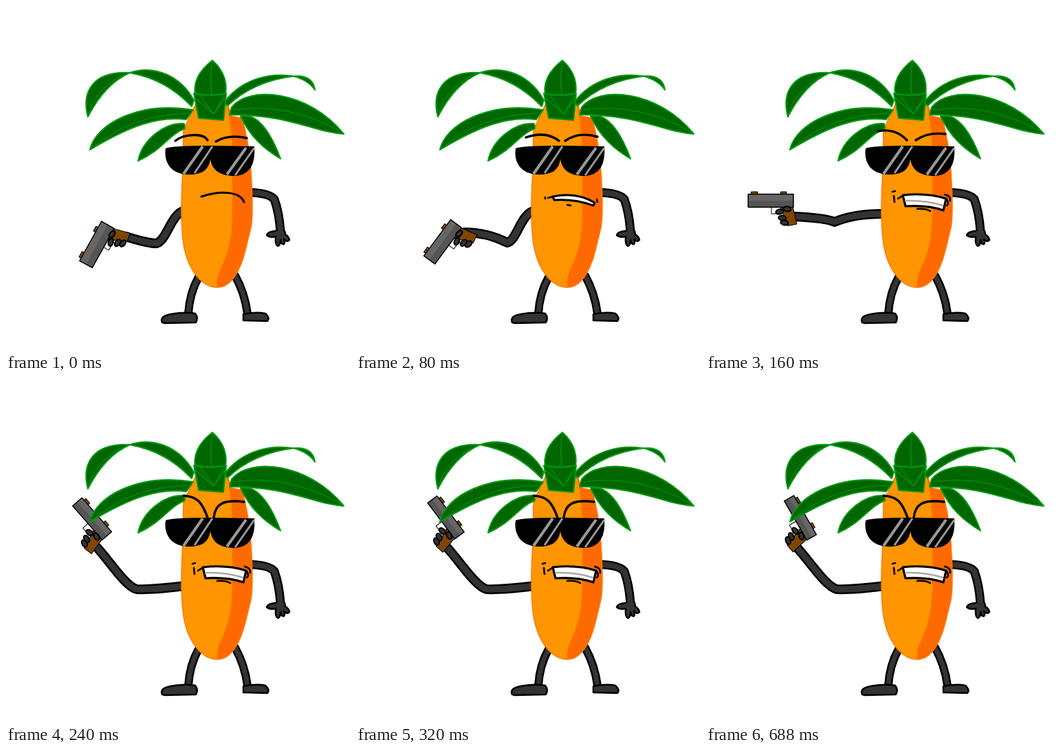
An HTML page with a canvas that plays this animation: 500x500 px, repeating every 0.88 s.

```html
<!DOCTYPE html>
<html lang="en">
<head>
<meta charset="utf-8">
<title>Cool carrot</title>
<style>
html, body { margin: 0; width: 100%; height: 100%; overflow: hidden; background: #fff; }
canvas { display: block; width: 100vmin; height: 100vmin; }
</style>
</head>
<body>
<canvas id="stage" width="500" height="500"></canvas>
<script>
const ctx = document.getElementById('stage').getContext('2d');
const LOOP = 880, STEP = 80;
const DARK = '#333', LEAF = '#006600', RIM = '#009911', BROWN = '#804600';

ctx.lineCap = ctx.lineJoin = 'round';

function shape(d, fill, stroke, width = 2) {
  const path = new Path2D(d);
  if (fill) { ctx.fillStyle = fill; ctx.fill(path); }
  if (stroke) { ctx.strokeStyle = stroke; ctx.lineWidth = width; ctx.stroke(path); }
}
const line = (d, width = 3, color = '#000') => shape(d, null, color, width);
const leaf = d => shape(d, LEAF, RIM, 2);

function limb(d, width = 13) {
  line(d, width);
  line(d, width - 5, DARK);
}

function box(x, y, w, h, fill) {
  shape(`M${x} ${y}h${w}v${h}h${-w}z`, fill, '#000', 1);
}

// Gun points left at angle 0; x, y is the middle of its slide.
const aim = (x, y, angle, arm) => ({ x, y, angle, arm });
const raised = 'M260 302Q212 308 190 307C174 303 152 268 ';
const guns = [
  aim(132, 347, -61, 'M260 297C239 302 234 342 218 345Q206 345 174 335'),
  aim(126, 343, -53.5, 'M260 297C239 302 234 341 220 344Q190 329 158 329'),
  aim(94, 283, 0, 'M260 302Q213 302 187 314Q174 308 127 306'),
  aim(125, 204.5, 49, raised + '132 246'),
  aim(130.5, 202.5, 53, raised + '132 246'),
  aim(137, 203, 60, raised + '131 245')
];

const brows = [
  'M246 196C258 186 287 184 293 195M305 197Q324 186 350 192',
  'M247 191Q276 181 295 196M304 196Q324 182 351 190',
  'M250 182Q275 177 292 195M305 195Q322 183 348 186',
  'M258 171Q273 172 280 179T293 203M302 203C304 183 316 176 346 180'
];

function drawGun({ x, y, angle, arm }, thick) {
  limb(arm, 14);
  ctx.save();
  ctx.translate(x, y);
  ctx.rotate(angle * Math.PI / 180);
  const top = -thick / 2;
  box(1.5, 8, 13, 11, '#fff');
  shape('M14 8H32L38 34 25 36.5Z', BROWN, '#000', 1);
  box(-28, top - 3.5, 9, 4, BROWN);
  box(15, top - 3.5, 8, 4, BROWN);
  box(-32.5, top, 65.5, thick, '#555');
  shape(`M-32 ${top}H32.5V0H-32Z`, '#666');
  line(`M-32.5 ${top}H33V${-top}H-32.5Z`, 1.3);
  for (const [fx, fy, tilt] of [[24, 12, 0.2], [13, 16, -0.2], [17, 25, 0.1], [20, 32, 0.2]]) {
    ctx.beginPath();
    ctx.ellipse(fx, fy, 5.6, 3.5, tilt, 0, 7);
    ctx.fillStyle = DARK;
    ctx.fill();
    ctx.strokeStyle = '#000';
    ctx.lineWidth = 2;
    ctx.stroke();
  }
  ctx.restore();
}

function drawLimbs() {
  limb('M280 394Q267 417 265 447', 12);
  limb('M333 392Q347 417 351 447', 12);
  shape('M227 460Q223 451 239 448Q262 444 275 447Q280 453 276 460L231 461Z', DARK, '#000', 2.5);
  shape('M345 457V448Q365 444 377 447Q384 453 380 458Z', DARK, '#000', 2.5);
  limb('M354 271Q383 272 390 281Q397 300 399 328');
  shape('M392 327Q380 328 379 333Q383 337 392 335Q391 347 395 349Q399 348 399 340Q400 347 404 346Q406 344 404 339Q409 344 412 340Q411 335 406 332L405 327', DARK, '#000', 2.5);
}

function drawBody() {
  const side = 'L328 160 343 163Q353 197 356 240Q360 302 356 322L348 355C340 387 326 409 307 409';
  const body = 'M258 180L271 152 277 140 321 140' + side +
    'C284 409 262 382 257 339Q253 300 257 240Z';
  shape(body, '#ff9500');
  shape('M321 140' + side + 'Q305 396 313 380C332 341 329 310 329 240Q331 190 321 140Z', '#ff6a00');
  line(body, 1.5, '#ff7a00');
}

function drawLeaves() {
  leaf('M119 161C110 127 124 94 180 97C157 107 137 126 119 161Z');
  leaf('M180 97C218 84 255 104 273 137L270 146C244 119 217 104 180 97Z');
  leaf('M122 209C130 172 192 138 272 151L262 165C220 160 180 174 122 209Z');
  leaf('M192 225C198 194 232 168 259 171L260 178C235 188 228 209 192 225Z');
  leaf('M317 140C344 104 386 97 418 102C377 107 347 121 322 145Z');
  leaf('M418 102Q446 100 449 122Q440 108 418 102Z');
  leaf('M341 160L354 160C375 167 389 195 399 222C374 207 355 190 341 160Z');
  leaf('M325 158L328 147C352 116 438 121 491 186C445 183 415 158 325 158Z');
  line('M331 151Q410 139 489 184M125 207Q180 158 265 156M120 159Q125 126 168 101', 1, RIM);
  leaf('M277 137C268 112 283 92 300 79C320 97 323 117 317 137Z');
  leaf('M273 127Q297 132 320 127L316 166 280 163Z');
  line('M300 80Q296 103 299 128M274 133L302 157 320 132M282 130L302 157 317 131', 1.2, RIM);
}

function drawShades() {
  shape('M232 207Q240 203 300 203L361 204Q364 245 333 247C309 247 299 237 297 222C295 239 284 245 266 245C239 245 229 226 232 207Z', '#000');
  ctx.lineCap = 'butt';
  line('M286 204L258 244M349 206L321 245', 4, '#999');
  line('M300 204L274 243M361 206L333 246', 3, '#999');
  ctx.lineCap = 'round';
}

function drawMouth(pose) {
  if (pose === 0) {
    line('M284 277C311 268 340 269 346 285');
  } else if (pose === 1) {
    shape('M286 277Q321 270 347 286L345 290Q318 280 288 282Z', '#fff', '#000', 3);
    line('M279 279L286 277M275 278V280M350 281L351 285M307 289L312 290', 2.5);
  } else {
    shape('M286 275Q321 271 349 280L345 297Q322 289 290 291Z', '#fff', '#000', 3.2);
    line('M290 283Q320 282 344 290', 2.5, '#aaa');
    line('M279 280L287 275M271 270L275 269M273 276L274 285M347 274Q356 276 355 283M350 281Q354 288 350 290M307 295Q319 294 326 298', 2.6);
  }
}

function draw(now) {
  const pose = Math.min(5, Math.floor((now % LOOP) / STEP));
  ctx.fillStyle = '#fff';
  ctx.fillRect(0, 0, 500, 500);
  drawGun(guns[pose], 21 - pose);
  drawLimbs();
  drawBody();
  drawLeaves();
  line(brows[Math.min(pose, 3)], 3.4);
  drawShades();
  drawMouth(pose);
}

const start = performance.now();
function tick() {
  draw(performance.now() - start);
  requestAnimationFrame(tick);
}
tick();
</script>
</body>
</html>
```
